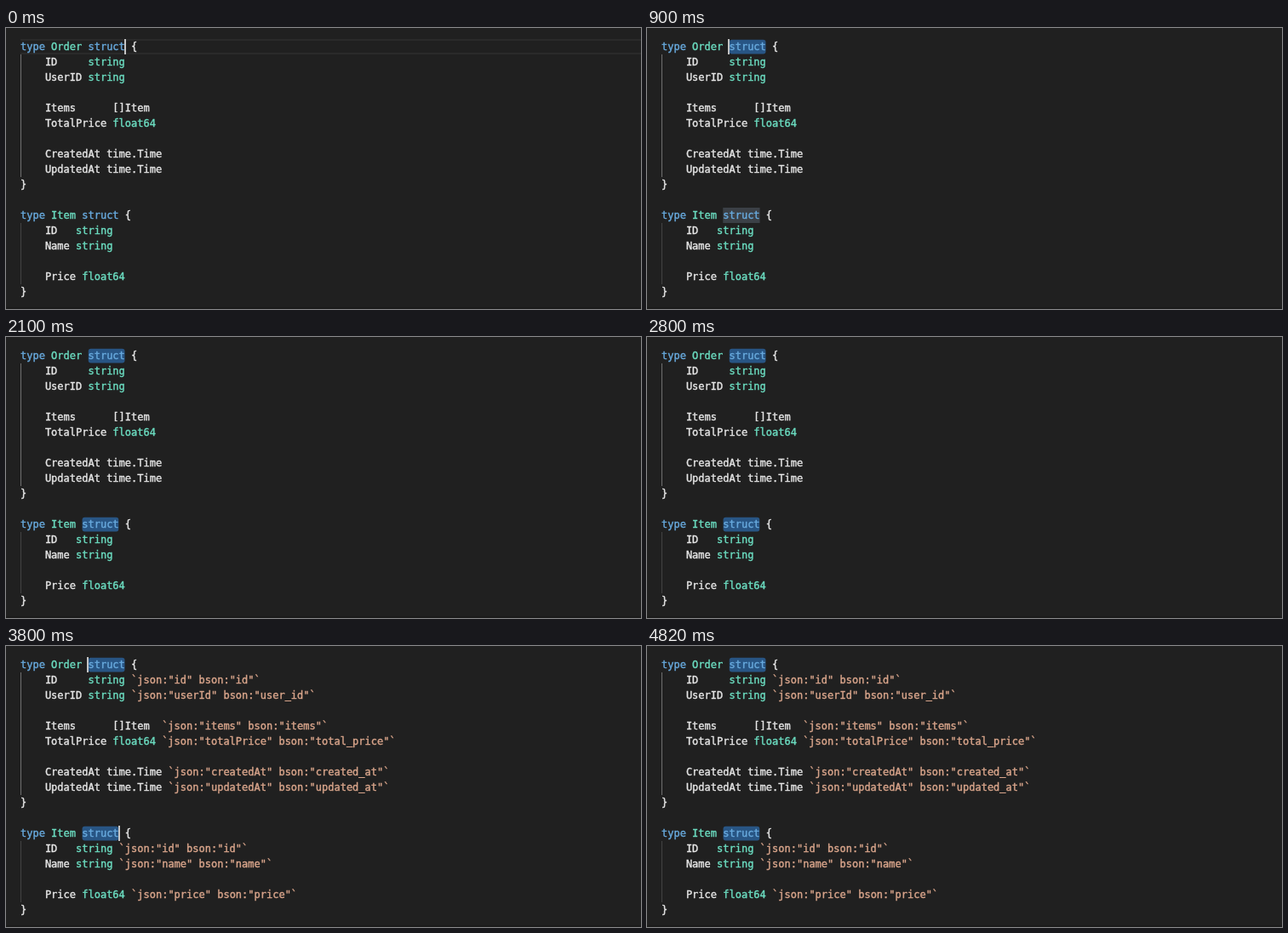
An HTML page that plays this animation: 746x330 px, repeating every 4.93 s.

```html
<!DOCTYPE html>
<html lang="en">
<head>
<meta charset="utf-8">
<title>Struct tags</title>
<style>
html, body { margin: 0; width: 100%; height: 100%; overflow: hidden; background: #202020; }
svg { display: block; }
text { font: 12px "DejaVu Sans Mono", monospace; stroke-width: .4px; white-space: pre; }
.key { fill: #68aade; stroke: #68aade; }
.type { fill: #6bdcc0; stroke: #6bdcc0; }
.plain { fill: #e6e6e6; stroke: #e6e6e6; }
.tag { fill: #d9a58b; stroke: #d9a58b; }
</style>
</head>
<body>
<svg id="stage" width="746" height="330" viewBox="0 0 746 330"></svg>
<script>
const LOOP = 4930, LEFT = 17, TOP = 13, ROW = 18, CHAR = 7.224;
const stage = document.getElementById('stage');
const colX = col => LEFT + col * CHAR;
const rowY = row => TOP + row * ROW;

function add(name, attrs, parent = stage) {
  const el = document.createElementNS('http://www.w3.org/2000/svg', name);
  for (const key in attrs) el.setAttribute(key, attrs[key]);
  return parent.appendChild(el);
}
function rect(x, y, width, height, fill, rx = 0) {
  return add('rect', { x, y, width, height, fill, rx });
}
function write(row, col, kind, str, parent) {
  add('text', { x: colX(col), y: rowY(row) + 13, class: kind }, parent).textContent = str;
}
const wordBox = (row, col, fill) => rect(colX(col), rowY(row), 6 * CHAR, ROW, fill);
const pickBox = (row, col) =>
  rect(colX(col) + .3, rowY(row) + .7, 6 * CHAR - .6, ROW - 1.2, '#285584', 3);
const caret = (row, col) => rect(Math.round(colX(col)) - 1, rowY(row), 2, ROW, '#c4c4c4');

rect(0, 0, 746, 330, '#202020');
rect(0, 328, 746, 2, '#1b1b1b');

const lineMark = add('path', { d: 'M17 14H746M17 30H746', stroke: '#2a2a2a', 'stroke-width': 2 });
rect(LEFT, rowY(1), 1, 8 * ROW, '#707070');
rect(LEFT, rowY(12), 1, 4 * ROW, '#434343');

const pickOrder = pickBox(0, 11);
const matchItem = wordBox(11, 10, '#3b4046');
const pickItem = pickBox(11, 10);
const tags = add('g', {});

// row, name, type column, type, tag column, json name, bson name
const fields = [
  [1, 'ID', 11, 'string', 18, 'id', 'id'],
  [2, 'UserID', 11, 'string', 18, 'userId', 'user_id'],
  [4, 'Items', 15, '[]Item', 23, 'items', 'items'],
  [5, 'TotalPrice', 15, 'float64', 23, 'totalPrice', 'total_price'],
  [7, 'CreatedAt', 14, 'time.Time', 24, 'createdAt', 'created_at'],
  [8, 'UpdatedAt', 14, 'time.Time', 24, 'updatedAt', 'updated_at'],
  [12, 'ID', 9, 'string', 16, 'id', 'id'],
  [13, 'Name', 9, 'string', 16, 'name', 'name'],
  [15, 'Price', 10, 'float64', 18, 'price', 'price']
];
for (const [row, name, typeCol, type, tagCol, json, bson] of fields) {
  write(row, 4, 'plain', name);
  write(row, typeCol, /^(string|float64)$/.test(type) ? 'type' : 'plain', type);
  write(row, tagCol, 'tag', '`json:"' + json + '" bson:"' + bson + '"`', tags);
}
for (const [row, name, end] of [[0, 'Order', 9], [11, 'Item', 16]]) {
  const col = 6 + name.length;
  write(row, 0, 'key', 'type');
  write(row, 5, 'type', name);
  write(row, col, 'key', 'struct');
  write(row, col + 7, 'plain', '{');
  write(end, 0, 'plain', '}');
}

const startCaret = caret(0, 17);
const orderCaret = caret(0, 11);
const itemCaret = caret(11, 16);

// time, caret strength from then on
const blink = [
  [0, 1], [500, 0], [900, 1], [1200, 0], [1600, 1], [2100, 0], [2500, 1], [2800, 0],
  [3100, .5], [3200, 1], [3400, 0], [3800, 1], [4100, 0],
  [4400, .5], [4500, 1], [4700, .5], [4820, 0]
];
const show = (el, level) => el.setAttribute('opacity', +level);

function draw(t) {
  let level = 0;
  for (const [at, value] of blink) if (t >= at) level = value;
  const picked = t >= 100, both = t >= 1800;
  show(lineMark, !picked);
  show(startCaret, picked ? 0 : level);
  show(pickOrder, picked);
  show(orderCaret, picked ? level : 0);
  show(matchItem, t >= 300 && !both);
  show(pickItem, both);
  show(itemCaret, both ? level : 0);
  show(tags, t >= 2900);
}

const start = performance.now();
function tick() {
  draw((performance.now() - start) % LOOP);
  requestAnimationFrame(tick);
}
draw(0);
requestAnimationFrame(tick);
</script>
</body>
</html>
```
